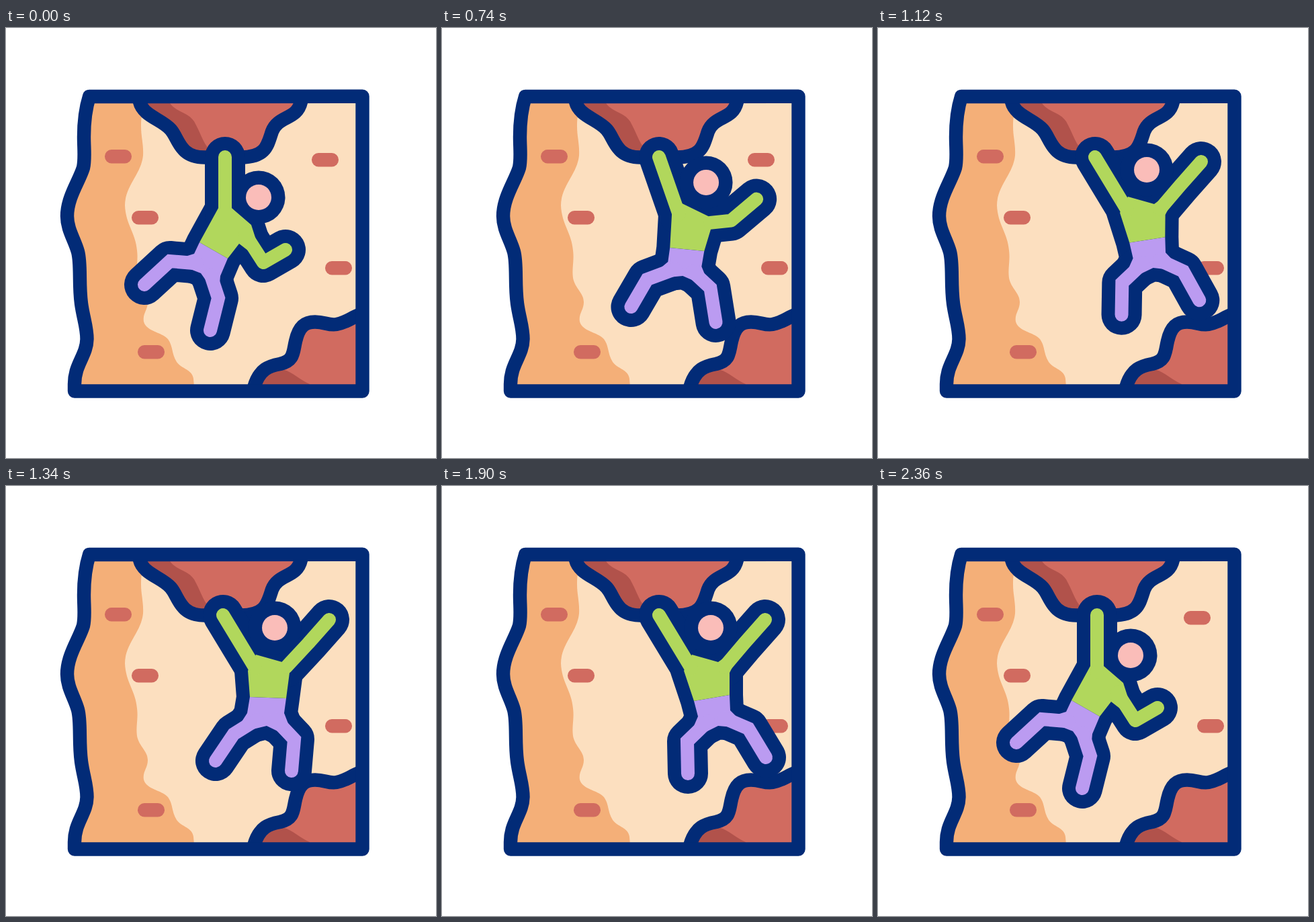
An HTML page for the animation above (2.4 s loop, 640 by 640 pixels).

```html
<!DOCTYPE html>
<html lang="en">
<head>
<meta charset="utf-8">
<title>Climber</title>
<style>
  html, body { margin: 0; width: 100%; height: 100%; overflow: hidden; background: #fff; }
  svg { display: block; width: 100vw; height: 100vh; }
  .rock { fill: #d16b60; }
  .shade { fill: #b1524b; }
  .edge { fill: none; stroke: #022b77; stroke-width: 20.4; stroke-linejoin: round; }
  .out { fill: #022b77; stroke: #022b77; stroke-linejoin: round; stroke-linecap: round; }
  .limb { fill: none; stroke-width: 20; stroke-linecap: round; }
</style>
</head>
<body>
<svg viewBox="0 0 640 640">
  <defs>
    <path id="cliff" d="M124 102C118 121 116 140 116 162C116 180 118 195 115 208C109 228 91 252 91 280C91 300 102 315 107 333C112 352 108 380 112 410C115 432 120.5 445 120.5 463C120 488 102 500 102 530V540.5H530.5V101.8Z"/>
    <path id="roof" d="M199 102V110C204 131 232 136 245 151C257 164 258 192.5 295 192.5H350C387 192 389 175 396 154C405 130 433 137 439 110V102"/>
    <path id="ledge" d="M369 535C377 507 392 503 408 500C429 495 427 483 431 466C436 444 445 437.5 460 437.5C475 437.5 480 443 492 441C508 438 514 431 526 427L532 424"/>
    <clipPath id="inside"><use href="#cliff"/></clipPath>
  </defs>
  <g clip-path="url(#inside)">
    <rect width="640" height="640" fill="#fcdfbf"/>
    <path fill="#f4af78" d="M60 90H205C205 118 201 128 201 146C201 162 205 174 204 190C201 218 177 235 177 264C178 292 193 305 195 331C197 346 193 358 195 372C198 388 211 394 211 408C211 420 203 425 205 437C209 452 231 452 241 463C249 474 246 484 254 497C262 508 277 508 279 522L281 545H60Z"/>
    <g id="pills" class="rock"></g>
    <use href="#roof" class="rock"/>
    <path class="shade" d="M199 102H238C250 128 268 122 280 139C290 157 292 168 303 182L295 192C258 192 257 164 245 151C232 136 204 131 199 110Z"/>
    <use href="#roof" class="edge"/>
    <path class="rock" d="M369 535C377 507 392 503 408 500C429 495 427 483 431 466C436 444 445 437.5 460 437.5C475 437.5 480 443 492 441C508 438 514 431 526 427L532 424V545H369Z"/>
    <path class="shade" d="M369 540C377 512 392 512 412 508C428 513 436 523 452 530V540Z"/>
    <use href="#ledge" class="edge"/>
  </g>
  <use href="#cliff" class="edge"/>
  <g id="man"></g>
</svg>
<script>
const LOOP = 2400;
const NAVY = '#022b77', GREEN = '#b1d75c', PURPLE = '#bb9bf1', PINK = '#fabdb9';

function add(parent, tag, attrs) {
  const el = document.createElementNS('http://www.w3.org/2000/svg', tag);
  for (const k in attrs) el.setAttribute(k, attrs[k]);
  return parent.appendChild(el);
}

const pills = document.getElementById('pills');
[[147, 181], [187, 272], [196, 472], [455, 186], [475, 347]].forEach(([x, y]) =>
  add(pills, 'rect', { x, y, width: 40, height: 20.5, rx: 10 }));

// Poses: joints and body corners (L/R as seen on screen)
const hang = {
  handL: [326, 192], neckL: [316, 268], neckR: [336, 268], hipL: [288, 319], hipR: [330, 343],
  pit: [347, 321], shoulder: [365, 293], elbow: [383, 349], handR: [416, 330], head: [376, 252],
  thighL: [280, 336], crotch: [290, 365], thighR: [319, 369],
  kneeL: [244, 347], footL: [206, 382], kneeR: [316, 402], footR: [304, 450]
};
const back = {
  handL: [324, 192], neckL: [309, 268], neckR: [328, 268], hipL: [276, 315], hipR: [313, 345],
  pit: [336, 322], shoulder: [355, 293], elbow: [369, 352], handR: [402, 338], head: [369, 256],
  thighL: [268, 327], crotch: [271, 354], thighR: [297, 371],
  kneeL: [229, 330], footL: [185, 356], kneeR: [287, 397], footR: [264, 443]
};
const reach = {
  handL: [323, 192], neckL: [342, 276], neckR: [357, 261], hipL: [339, 327], hipR: [390, 332],
  pit: [400, 299], shoulder: [398, 281], elbow: [430, 287], handR: [468, 255], head: [393, 230],
  thighL: [336, 348], crotch: [358, 369], thighR: [386, 355],
  kneeL: [305, 374], footL: [281, 415], kneeR: [399, 387], footR: [407, 438]
};
const grab = {
  handL: [323, 192], neckL: [360, 275], neckR: [372, 251], hipL: [375, 320], hipR: [428, 311],
  pit: [428, 278], shoulder: [411, 262], elbow: [450, 234], handR: [481, 199], head: [400, 211],
  thighL: [381, 343], crotch: [411, 357], thighR: [429, 334],
  kneeL: [365, 380], footL: [366, 428], kneeR: [456, 361], footR: [482, 404]
};
const land = { ...grab, kneeL: [362, 380], footL: [346, 425] };
const swing = {
  ...grab, hipL: [363, 314], hipR: [417, 316], pit: [422, 278],
  thighL: [359, 338], crotch: [388, 357], thighR: [414, 338],
  kneeL: [339, 369], footL: [312, 409], kneeR: [429, 377], footR: [425, 424]
};

const parts = Object.keys(hang);
const mixPt = (p, q, u) => p.map((v, i) => v + (q[i] - v) * u);
const mix = (p, q, u) => Object.fromEntries(parts.map(n => [n, mixPt(p[n], q[n], u)]));

const keys = [
  [110, hang], [420, back], [480, mix(hang, back, 1.1)], [540, back], [740, reach],
  [900, land], [1010, grab], [1080, grab], [1340, swing], [1450, mix(grab, swing, 1.03)],
  [1560, swing], [1820, grab], [1900, grab], [2060, reach], [2300, hang]
];
const times = keys.map(k => k[0]);

// Monotone cubic track: smooth between keys, at rest at every turning point
function track(vals) {
  const sec = vals.slice(1).map((v, i) => (v - vals[i]) / (times[i + 1] - times[i]));
  const slope = vals.map((_, i) => {
    const a = sec[i - 1], b = sec[i];
    return a * b > 0 ? 2 * a * b / (a + b) : 0;
  });
  return (i, u) => {
    const h = times[i + 1] - times[i], u2 = u * u, u3 = u2 * u, s = 3 * u2 - 2 * u3;
    return vals[i] + (vals[i + 1] - vals[i]) * s
      + h * (slope[i] * (u3 - 2 * u2 + u) + slope[i + 1] * (u3 - u2));
  };
}
const tracks = parts.map(n => [0, 1].map(c => track(keys.map(k => k[1][n][c]))));

function poseAt(t) {
  const last = times.length - 1;
  t = Math.min(Math.max(t, times[0]), times[last]);
  let i = 0;
  while (i < last - 1 && t >= times[i + 1]) i++;
  const u = (t - times[i]) / (times[i + 1] - times[i]);
  return Object.fromEntries(parts.map((n, k) => [n, tracks[k].map(f => f(i, u))]));
}

const man = document.getElementById('man');
const outBody = add(man, 'path', { class: 'out', 'stroke-width': 40 });
const outLimbs = add(man, 'path', { class: 'out', 'stroke-width': 60, style: 'fill:none' });
const outHead = add(man, 'circle', { r: 39.5, fill: NAVY });
const head = add(man, 'circle', { r: 19, fill: PINK });
const hips = add(man, 'path', { fill: PURPLE });
const legs = add(man, 'path', { class: 'limb', stroke: PURPLE });
const torso = add(man, 'path', { fill: GREEN });
const arms = add(man, 'path', { class: 'limb', stroke: GREEN, 'stroke-linejoin': 'round' });

const line = (...pts) => 'M' + pts.map(p => p[0].toFixed(2) + ' ' + p[1].toFixed(2)).join('L');
const mid = (p, q) => mixPt(p, q, 0.5);

function draw(t) {
  const p = poseAt(t);
  const chest = line(p.neckL, p.hipL, p.hipR, p.pit, p.elbow, p.shoulder, p.neckR) + 'Z';
  const seat = line(p.hipL, p.hipR, p.thighR, p.kneeR, p.crotch, p.kneeL, p.thighL) + 'Z';
  // the hanging arm runs a little way into the chest
  const armD = line(p.handL, mixPt(p.handL, mid(p.neckL, p.neckR), 1.12))
    + line(mid(p.pit, p.shoulder), p.elbow, p.handR);
  const legD = line(mid(p.thighL, p.crotch), p.kneeL, p.footL)
    + line(mid(p.crotch, p.thighR), p.kneeR, p.footR);
  outBody.setAttribute('d', chest + seat);
  outLimbs.setAttribute('d', armD + legD);
  torso.setAttribute('d', chest);
  hips.setAttribute('d', seat);
  arms.setAttribute('d', armD);
  legs.setAttribute('d', legD);
  for (const c of [outHead, head]) {
    c.setAttribute('cx', p.head[0]);
    c.setAttribute('cy', p.head[1]);
  }
}

const start = performance.now();
function tick() {
  draw((performance.now() - start) % LOOP);
  requestAnimationFrame(tick);
}
tick();
</script>
</body>
</html>
```
